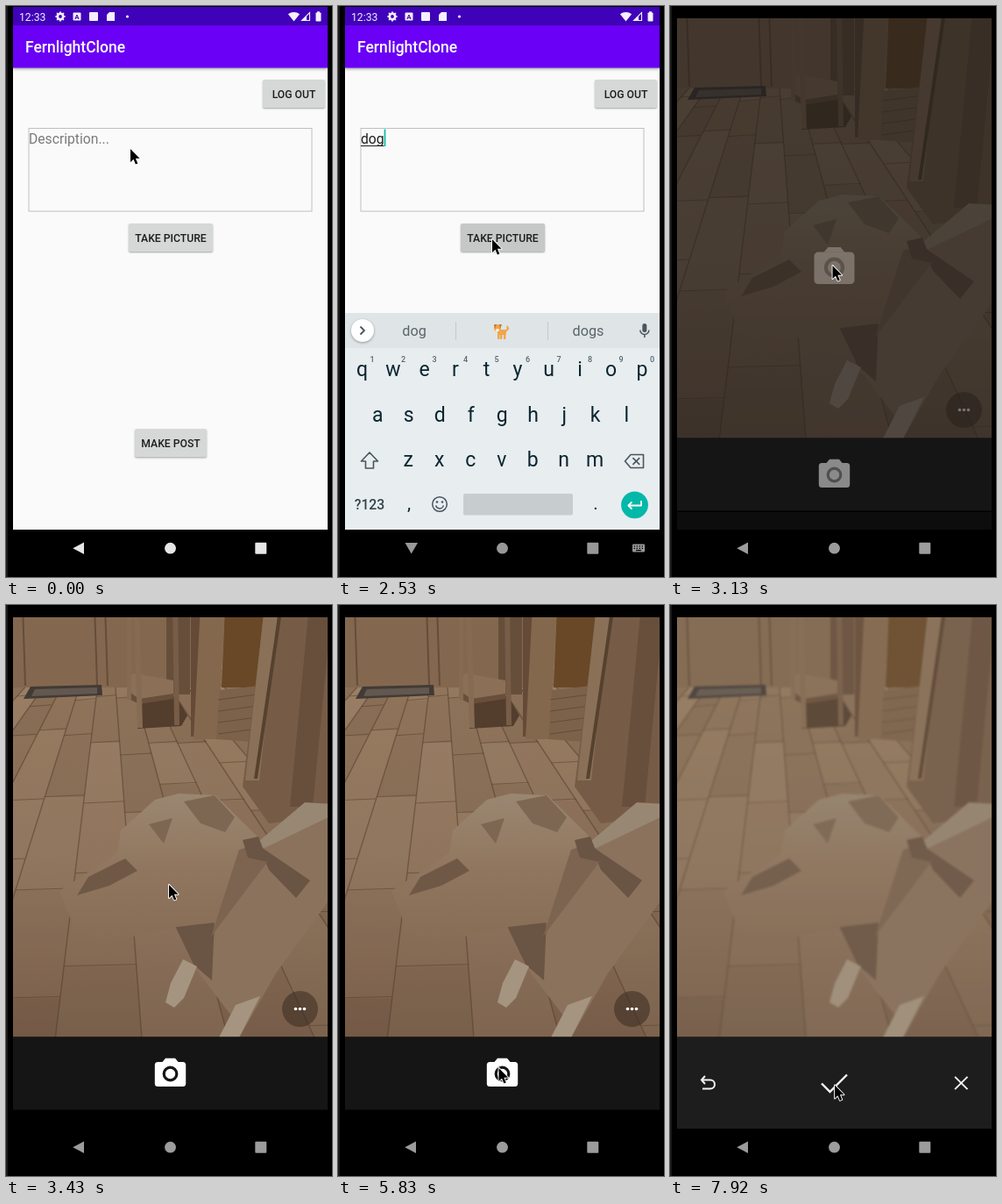
Recreate the animation shown at these times as an HTML page with a canvas. Size 372 by 651 pixels, loop 8 s.

```html
<!DOCTYPE html>
<html lang="en">
<head>
<meta charset="utf-8">
<title>Photo post demo</title>
<style>
html, body { margin: 0; width: 372px; height: 651px; overflow: hidden; background: #000; }
canvas { display: block; width: 372px; height: 651px; }
</style>
</head>
<body>
<canvas id="stage"></canvas>
<script>
const W = 372, H = 651, LOOP = 8000;
const TICK = 149.5; // the screen refreshes once per tick
const dpr = window.devicePixelRatio || 1;
const stage = document.getElementById('stage');
let g;

function setup(canvas) {
  canvas.width = W * dpr;
  canvas.height = H * dpr;
  const c = canvas.getContext('2d');
  c.scale(dpr, dpr);
  return c;
}
const clamp = u => Math.max(0, Math.min(1, u));
const ramp = (n, from, to) => clamp((n - from) / (to - from));

// ---- drawing helpers ----
function rect(color, x, y, w, h, r = 0) {
  g.fillStyle = color;
  g.beginPath();
  if (r) g.roundRect(x, y, w, h, r); else g.rect(x, y, w, h);
  g.fill();
}
function disc(color, x, y, r) {
  g.fillStyle = color;
  g.beginPath();
  g.arc(x, y, r, 0, 7);
  g.fill();
}
function trace(p) {
  g.beginPath();
  for (let i = 0; i < p.length; i += 2) g.lineTo(p[i], p[i + 1]);
}
function poly(color, ...p) {
  g.fillStyle = color;
  trace(p);
  g.fill();
}
function line(color, width, ...p) {
  g.strokeStyle = color;
  g.lineWidth = width;
  trace(p);
  g.stroke();
}
function outline(color, width, ...p) {
  line(color, width, ...p, p[0], p[1], p[2], p[3]);
}
function arc(color, width, x, y, r, from = 0, to = 7) {
  g.strokeStyle = color;
  g.lineWidth = width;
  g.beginPath();
  g.arc(x, y, r, from, to);
  g.stroke();
}
function text(s, x, y, size, color, align = 'left', weight = 400) {
  g.font = `${weight} ${size}px Roboto, sans-serif`;
  g.textAlign = align;
  g.fillStyle = color;
  g.fillText(s, x, y);
}
function saved(draw) {
  g.save();
  draw();
  g.restore();
}
function shadowed(blur, draw) {
  saved(() => {
    g.shadowColor = 'rgba(0,0,0,.35)';
    g.shadowBlur = blur * dpr;
    g.shadowOffsetY = dpr;
    draw();
  });
}
function faded(alpha, draw) {
  saved(() => { g.globalAlpha = alpha; draw(); });
}
function clipped(x, y, w, h, draw) {
  saved(() => {
    g.beginPath();
    g.rect(x, y, w, h);
    g.clip();
    draw();
  });
}
function shade(y0, y1, ...colors) {
  const s = g.createLinearGradient(0, y0, 0, y1);
  colors.forEach((c, i) => s.addColorStop(i / (colors.length - 1), c));
  return s;
}

// ---- camera view ----
let seed = 11;
const rnd = () => (seed = (seed * 16807) % 2147483647) / 2147483647;

// boards run toward a vanishing point above the picture
function floor() {
  const seam = 'rgba(80,58,42,.5)';
  const at = (k, y) => 117 + k * (y + 12);
  rect(shade(90, 492, '#92775d', '#8a6f58', '#765c48'), 0, 0, W, H);
  for (let i = -7; i < 9; i++) {
    const k = .195 * i - .12, k2 = k + .195;
    let y = 85 - rnd() * 50;
    while (y < 500) {
      const end = y + (y + 30) * (.2 + rnd() * .3);
      const tone = rnd() < .5 ? '225,205,175' : '60,38,24';
      poly(`rgba(${tone},${rnd() * .1})`, at(k, y), y, at(k2, y), y, at(k2, end), end, at(k, end), end);
      line(seam, 1, at(k, end), end, at(k2, end), end - 2);
      y = end;
    }
    line(seam, 1.4, at(k, 80), 80, at(k, 500), 500);
  }
}
// an upright board from the top edge down, leaning sideways
function board(color, x, w, bottom, lean = 0) {
  poly(color, x, 0, x + w, 0, x + w + lean, bottom, x + lean, bottom);
}
function room() {
  board('#83684f', 0, 215, 94);
  for (const x of [18, 100, 112, 138]) board('#654d3a', x, 2, 92, 3);
  board('#664e3b', 183, 27, 102);
  poly('#423a35', 28, 93, 109, 91, 110, 103, 20, 107);
  poly('#625850', 33, 96, 104, 94, 104, 101, 29, 104);
  poly('#533d2d', 153, 110, 194, 104, 207, 126, 200, 138, 150, 141);
  poly('#694f3b', 138, 90, 191, 88, 191, 107, 152, 113, 138, 106);
  poly('#8b7057', 138, 82, 147, 78, 191, 86, 191, 101, 152, 107, 138, 97);
  board('#866b53', 138, 5, 108);
  board('#866b53', 146, 6, 140, 4);
  board('#775d47', 190, 6, 137, 2);
  board('#654b37', 211, 12, 150);
  board('#84684e', 222, 28, 153, -8);
  board('#684827', 250, 46, 94, -4);
  poly('#7d624a', 244, 97, 290, 92, 280, 156, 240, 153);
  for (let y = 108; y < 155; y += 13) line('#654c39', 1, 242, y, 287, y - 6);
  poly('#765c47', 296, 0, W, 0, W, 240, 300, 249, 270, 207);
  board('#8b7058', 295, 16, 200, -22);
  board('#56412f', 312, 4, 198, -29);
  board('#674f3c', 346, 26, 230, -22);
}
function dog() {
  const fur = '#8b725c', dark = '#6a5443', pale = '#a59480', mid = '#7d6753';
  poly(fur, 285, 272, 340, 228, W, 226, W, 332, 308, 420, 265, 495, 242, 495, 257, 468, 214, 412, 193, 366);
  poly('#988773', 283, 274, 341, 225, W, 227, W, 240, 295, 277);
  poly(dark, 288, 274, 347, 314, 331, 334, 300, 302);
  poly(dark, 193, 366, 238, 358, 235, 428, 214, 410);
  poly(pale, 202, 404, 218, 412, 203, 448, 192, 459, 182, 453, 188, 431);
  poly(pale, 262, 456, 290, 446, 265, 495, 242, 495);
  poly(shade(215, 385, '#9a8771', '#91765f', '#876c56'), 61, 326, 127, 283, 131, 257, 170, 222, 197, 215,
    239, 217, 287, 264, 238, 362, 195, 367, 113, 385, 80, 374);
  poly(mid, 203, 224, 238, 217, 261, 242, 250, 259, 222, 249);
  poly(mid, 163, 250, 190, 243, 180, 272);
  poly('#6f5946', 81, 331, 94, 310, 136, 289, 150, 303, 118, 320);
  poly('#7c6450', 266, 279, 288, 272, 299, 292, 234, 378);
  poly(dark, 270, 268, 288, 264, 299, 293, 276, 288);
}
const scene = document.createElement('canvas');
g = setup(scene);
floor();
room();
dog();
g = setup(stage);

function picture(blur) {
  clipped(8, 14, 359, 478.5, () => {
    g.filter = `blur(${blur * dpr}px)`;
    g.drawImage(scene, 0, 0, W, H);
  });
}
function camera(x, y, s, color, lens) {
  saved(() => {
    g.translate(x, y);
    g.scale(s, s);
    rect(color, -17.7, -13, 35.4, 28, 3.5);
    poly(color, -9, -13, -5.5, -17.3, 5.5, -17.3, 9, -13);
    arc(lens, 3.2, 0, .5, 7.3);
  });
}

// ---- system bars ----
function statusIcons() {
  const c = '#f4f0ff';
  text('12:33', 15, 16.5, 12.2, c);
  arc(c, 2.6, 62, 12, 3.2);
  for (let a = 0; a < 6; a += Math.PI / 4) arc(c, 1.6, 62, 12, 4.8, a - .2, a + .2);
  rect(c, 76.5, 7.5, 9, 9, 1);
  text('A', 81, 15, 8, '#3d05ae', 'center', 700);
  rect(c, 95, 7, 10, 10, 1);
  poly(c, 118, 7, 124, 7, 124, 17, 115, 17, 115, 10);
  disc(c, 138.5, 12, 1.6);
  g.beginPath();
  g.moveTo(328.5, 17.5);
  g.arc(328.5, 17.5, 10.5, -2.25, -.89);
  g.fill();
  outline(c, 1.1, 337.5, 16.5, 346.5, 16.5, 346.5, 7.5);
  poly(c, 337.5, 16.5, 343, 16.5, 343, 11);
  rect(c, 353.5, 7.5, 6, 10, .8);
  rect(c, 355, 6.3, 3, 2);
}
function nav(color, typing, icon) {
  if (typing) poly(color, 76.5, 612, 91, 612, 83.7, 624.5);
  else poly(color, 89, 611.5, 89, 625, 76.3, 618.2);
  disc(color, 187.5, 618.2, 6.4);
  rect(color, 284.3, 611.8, 13, 13, 1);
  if (icon) {
    rect(color, 336, 613.5, 14, 9, 1);
    for (let i = 0; i < 8; i++) rect('#000', 337.6 + (i % 4) * 3, 615.2 + (i >> 2) * 2.5, 1.4, 1.3);
    rect('#000', 340, 620, 6, 1.2);
  }
}

// ---- form ----
function button(label, x, y, w, color = '#d6d7d7') {
  shadowed(2, () => rect(color, x, y, w, 32, 2));
  text(label, x + w / 2, y + 20.5, 12.2, '#1d1d1d', 'center', 500);
}
function form(word, caret, press, lift) {
  rect('#4002b8', 8, 1, 359, 21);
  saved(() => {
    g.translate(0, -lift);
    rect('#fafafa', 8, 70, 359, 527 + lift);
    shadowed(3, () => rect('#6a00f5', 8, 22, 359, 48.5));
    text('FernlightClone', 22, 53, 17.5, '#fff', 'left', 500);
    button('LOG OUT', 293, 84, 71);
    g.strokeStyle = '#bfbfbf';
    g.lineWidth = 1;
    g.strokeRect(26, 139.5, 323, 94.5);
    text(word || 'Description...', 26, 156.5, 15.7, word ? '#202020' : '#7b7b7b');
    const w = word ? g.measureText(word).width : 0;
    rect('#202020', 26, 159, w, 1);
    if (caret) rect('#0bbfae', 26 + w, 140.5, 1.8, 19.5);
    button('TAKE PICTURE', 140, 248, 96, ['#d6d7d7', '#c6c7c7', '#b9baba'][press]);
    button('MAKE POST', 147, 482.3, 82);
  });
}

// ---- keyboard ----
function puppy(x, y) {
  const c = '#f0a64a';
  rect(c, x - 4, y - 2, 10, 6, 2.5);
  disc(c, x - 4, y - 4, 4);
  for (const dx of [-8, -2]) poly('#c9772b', x + dx, y - 8, x + dx + 3, y - 8, x + dx + 1, y - 3);
  rect('#fff1dc', x - 6, y - 3, 4, 3, 1.5);
  for (const dx of [-4, -1, 3]) rect(c, x + dx, y + 2, 2.4, 7, 1);
  line(c, 2.2, x + 5, y, x + 8, y - 3, x + 7, y - 6);
}
function keyboard(word) {
  const ink = '#0b2630', soft = '#48565d', hint = '#5a656a';
  const row = (keys, x, y, size = 23, color = ink, weight = 400) =>
    [...keys].forEach((k, i) => text(k, x + i * 35.5, y, size, color, 'center', weight));
  rect('#e8edf0', 8, 350, 359, 247);
  rect('#dfe4e7', 8, 350, 359, 40);
  shadowed(3, () => disc('#fff', 28, 370, 13));
  line(soft, 1.8, 25.5, 365.5, 30, 370, 25.5, 374.5);
  for (const x of [134, 239]) rect('#c3c9cc', x, 360, 1, 21);
  text(word, 87, 376, 16.2, hint, 'center');
  if (word === 'dog') {
    puppy(186, 371);
    text('dogs', 285.5, 376, 16.2, hint, 'center');
  }
  rect(soft, 347.3, 362, 5, 10, 2.5);
  arc(soft, 1.5, 349.8, 369.5, 5, 0, Math.PI);
  line(soft, 1.5, 349.8, 374, 349.8, 378);

  row('qwertyuiop', 27.5, 421.5);
  row('asdfghjkl', 45.2, 473.5);
  row('zxcvbnm', 80.2, 525);
  row('1234567890', 39, 405.5, 9, '#56666e', 500);

  g.lineJoin = 'round';
  outline(soft, 1.6, 36, 509, 45.5, 519, 40.5, 519, 40.5, 527, 31.5, 527, 31.5, 519, 26.5, 519);
  outline(soft, 1.6, 327.5, 519, 334, 511.5, 348.5, 511.5, 348.5, 526.5, 334, 526.5);
  cross(soft, 1.6, 340.3, 519, 3.9);
  text('?123', 36, 573.5, 15.8, '#33444c', 'center', 500);
  text(',', 81, 574, 21, ink, 'center');
  text('.', 294, 574, 21, ink, 'center');
  arc(soft, 1.5, 116, 568, 8.3);
  arc(soft, 1.5, 116, 568.5, 4.4, .2, 2.94);
  for (const x of [113, 119]) disc(soft, x, 565.5, 1.3);
  rect('#c7cccf', 143, 556, 125, 24.5, 2);
  disc('#02b8a9', 338.5, 568.8, 15.4);
  line('#fff', 1.8, 346, 564, 346, 569.5, 331.5, 569.5);
  line('#fff', 1.8, 335.5, 565.3, 331.3, 569.5, 335.5, 573.7);
  g.lineJoin = 'miter';
}
function cross(color, width, x, y, r) {
  line(color, width, x - r, y - r, x + r, y + r);
  line(color, width, x + r, y - r, x - r, y + r);
}

// ---- screens; n counts ticks ----
function compose(n) {
  const word = 'dog'.slice(0, Math.max(0, n - 7));
  form(word, n > 0, Math.max(0, n - 16), 0);
  clipped(8, 340, 359, 257, () => {
    g.translate(0, 260 * (1 - ramp(n, 1, 4)) ** 2);
    keyboard(word);
  });
  statusIcons();
  nav(n < 2 ? '#e6e6e6' : '#989898', n > 1, n > 3);
}
function opening() {
  form('dog', true, 0, 10);
  rect('#000', 8, 597, 359, 54);
  rect('#1c1c1c', 13, 12, 348.5, 400);
  camera(187.5, 299.5, 1.25, '#6e6e70', '#1c1c1c');
  clipped(8, 340, 359, 290, () => {
    g.translate(187.5, 262);
    g.scale(1.04, 1.037);
    g.translate(-187.5, -262);
    keyboard('dog');
    rect('rgba(0,0,0,.1)', 8, 350, 359, 247);
  });
  statusIcons();
  nav('#989898', true, false);
}
function viewfinder(n) {
  const veil = 1 - ramp(n, 20, 23), press = ramp(n, 40, 44);
  picture(.7);
  disc('rgba(58,42,32,.55)', 335.5, 460.5, 20.5);
  for (const dx of [-5, 0, 5]) disc('#fff', 335.5 + dx, 460.5, 1.8);
  rect(`rgba(27,25,24,${veil * .92})`, 8, 14, 359, 478.5);
  rect('#151515', 8, 492.5, 359, 83);
  if (veil) rect('#0d0d0d', 8, 577, 359, 20);
  clipped(8, 492.5, 359, 66.5, () => disc('#1b3558', 187.5, 534, 260 * press ** 2));
  faded((1 - veil * .75) * (1 - press * .79), () => camera(187.5, 534, 1, '#fff', '#151515'));
  faded(veil * .75, () => camera(187.5, 297.5, 1.3, '#b0a8a0', '#3a332d'));
  nav('#9c9c9c', false, false);
}
function review(n) {
  picture(1.2);
  rect('rgba(140,125,106,.2)', 8, 14, 359, 478.5);
  rect('#1d1d1d', 8, 492.5, 359, 104.5);
  faded(ramp(n, 45, 47), () => {
    const c = '#f5f5f5';
    line(c, 2.4, 173, 545.5, 182.5, 555, 202, 535.5);
    cross(c, 1.9, 332.3, 545, 7.2);
    line(c, 2, 40, 537, 36, 541.5, 40, 546);
    line(c, 2, 36, 541.5, 46, 541.5);
    arc(c, 2, 46, 546.5, 5, -Math.PI / 2, Math.PI / 2);
    line(c, 2, 46, 551.5, 37, 551.5);
  });
  nav('#9c9c9c', false, false);
}

// tick, x, y of the pointer's turning points
const path = [
  [9, 142, 163], [11, 162, 240], [15, 176, 266], [19, 176, 266], [21, 185.5, 296], [23, 186, 319],
  [27, 223, 507], [28, 217, 552], [30, 197.5, 537], [37, 197.5, 537], [39, 183.5, 528],
  [48, 183.5, 528], [51, 188, 547.5]
];
function arrow(n) {
  const i = path.findIndex(p => p[0] > n);
  const b = path.at(i), a = i > 0 ? path[i - 1] : b;
  const u = ramp(n, a[0], b[0] + (a === b)), e = u * u * (3 - 2 * u);
  saved(() => {
    g.translate(a[1] + (b[1] - a[1]) * e, a[2] + (b[2] - a[2]) * e);
    g.lineJoin = 'round';
    outline('#fff', 1.8, 0, 0, 0, 15, 3.5, 11.8, 5.9, 17.4, 8.3, 16.4, 5.9, 10.8, 10.6, 10.8);
    g.fillStyle = '#000';
    g.fill();
  });
}

function draw(t) {
  const n = Math.floor((t + 15) / TICK);
  rect('#000', 0, 0, W, H);
  rect('#1b1b1b', 0, 0, 2, H);
  if (n < 19) compose(n);
  else if (n < 20) opening();
  else if (n < 46) viewfinder(n);
  else review(n);
  arrow(n);
}

const start = performance.now();
function tick() {
  draw((performance.now() - start) % LOOP);
  requestAnimationFrame(tick);
}
tick();
</script>
</body>
</html>
```
